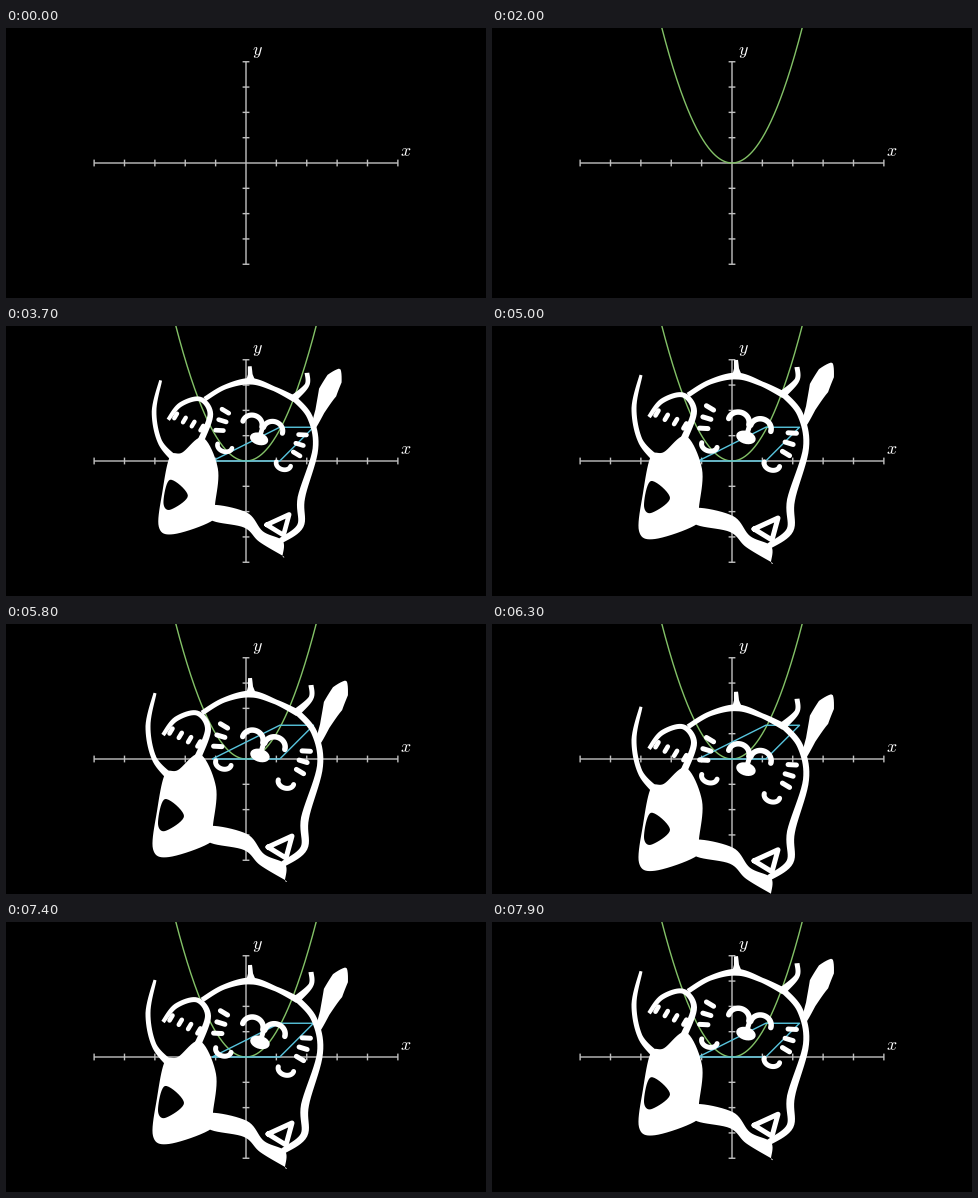
These frames come from a looping animation (480 px wide and 270 px high, 8 s). A matplotlib script:

```python
import numpy as np
import matplotlib.pyplot as plt
from matplotlib.animation import FuncAnimation
from matplotlib.patches import Polygon
from matplotlib.transforms import Affine2D

W, H, DPI = 480, 270, 100
FRAMES, STEP = 80, 100
CX, CY, UNIT = 240, 135, 33.75
XSTEP, YSTEP = 30.375, 25.3125
PX = 72 / DPI
GREY, GREEN, BLUE, WHITE = "#c0c0c0", "#83c167", "#58c4dd", "#ffffff"

plt.rcParams["mathtext.fontset"] = "cm"
fig = plt.figure(figsize=(W / DPI, H / DPI), dpi=DPI, facecolor="black")
ax = fig.add_axes([0, 0, 1, 1])
ax.set_xlim(0, W)
ax.set_ylim(H, 0)
ax.axis("off")


def sigmoid(v):
    return 1 / (1 + np.exp(-v))


def smooth(t):
    t = np.clip(t, 0, 1)
    edge = sigmoid(-5)
    return float(np.clip((sigmoid(10 * (t - 0.5)) - edge) / (1 - 2 * edge), 0, 1))


def running_start(t):
    """Bezier easing that first pulls back."""
    t = float(np.clip(t, 0, 1))
    u = 1 - t
    return (-7.5 * t**2 * u**4 - 10 * t**3 * u**3
            + 15 * t**4 * u**2 + 6 * t**5 * u + t**6)


def spline(points, closed=False, n=10):
    """Catmull-Rom curve through the points; a repeated point makes a corner."""
    p = np.array(points, float)
    p = np.vstack([p[-1:], p, p[:2]]) if closed else np.vstack([p[:1], p, p[-1:]])
    t = np.linspace(0, 1, n, endpoint=False)[:, None]
    parts = []
    for a, b, c, d in zip(p, p[1:], p[2:], p[3:]):
        parts.append(0.5 * (2 * b + (c - a) * t + (2 * a - 5 * b + 4 * c - d) * t**2
                            + (3 * b - a - 3 * c + d) * t**3))
    return np.vstack(parts + [p[-2:-1]])


def line(xs, ys, color, width, z):
    return ax.plot(xs, ys, color=color, lw=width * PX, zorder=z, snap=False,
                   solid_capstyle="butt")[0]


# Axes
def axis(direction, step, count):
    along = np.array(direction)
    across = along[::-1] * 3.4
    spots = [(k, np.array([CX, CY]) + along * k * step) for k in range(-count, count + 1)]
    line(*np.transpose([spots[0][1], spots[-1][1]]), GREY, 1.4, 1)
    for k, spot in spots:
        if k:
            line(*np.transpose([spot - across, spot + across]), GREY, 1.4, 1)


axis((1, 0), XSTEP, 5)
axis((0, 1), YSTEP, 4)
for name, x, y in (("$x$", 394.5, 128), ("$y$", 246, 26.5)):
    ax.text(x, y, name, color=WHITE, fontsize=18 * PX, va="baseline", zorder=1)

curve = line([], [], GREEN, 1.4, 2)
shape = line([], [], BLUE, 1.4, 3)
CORNERS = np.array([(-1, 0), (1, 0), (2, 1), (1, 1), (-1, 0)]) * (UNIT, -UNIT) + (CX, CY)

# Cat, drawn at full size
cat_fills, cat_strokes = [], []


def fill(outline, color=WHITE, z=5):
    cat_fills.append(ax.add_patch(Polygon(outline, fc=color, ec="none", lw=0, zorder=z)))


def blob(points, color=WHITE, z=5):
    fill(spline(points, closed=True), color, z)


def brush(points, *widths):
    """Stroke along a spline whose width runs through the given values."""
    path = spline(points)
    along = np.linspace(0, 1, len(path))
    half = np.interp(along, np.linspace(0, 1, len(widths)), widths) / 2
    dx, dy = np.gradient(path, axis=0).T
    offset = np.column_stack([-dy, dx]) * (half / np.hypot(dx, dy))[:, None]
    fill(np.vstack([path + offset, (path - offset)[::-1]]))


def stroke(points, width=5):
    item = line(*np.transpose(points), WHITE, width, 7)
    item.set_solid_capstyle("round")
    item.set_solid_joinstyle("round")
    cat_strokes.append((item, width))


def draw_body():
    brush([(149, 49), (142, 82), (148, 114), (164, 133)], 3, 5, 5, 8)
    blob([(159, 130), (151, 167), (147, 205), (163, 213), (205, 198), (207, 181),
          (210, 143), (194, 110), (172, 126)])
    blob([(159, 155), (178, 172), (159, 187), (152, 179)], "black", 6)
    brush([(157, 91), (170, 75), (191, 69), (202, 85), (192, 113)], 4, 5, 5, 6, 7)
    for k in range(4):
        x, y = 165 + 9.3 * k, 87 + 4.3 * k
        stroke([(x - 1.5, y + 2.5), (x + 1.5, y - 2.5)], 4.6)


def draw_head():
    brush([(196, 69), (218, 56), (245, 50), (270, 58), (292, 69)], 5, 5, 7, 5, 7)
    brush([(244, 34), (245, 51)], 4, 5, 12)
    brush([(305, 41), (305, 54), (291, 68)], 5, 5, 8)
    brush([(290, 67), (308, 88), (314, 122), (299, 174), (298, 204), (277, 220)],
          6, 6, 6, 8, 7, 6)
    brush([(340, 37), (327, 62), (312, 99)], 2, 17, 20, 10, 5)
    blob([(203, 182), (241, 190), (258, 210), (279, 220), (279, 236), (279, 236),
          (254, 221), (238, 206), (203, 198)])
    stroke([(262, 203), (286, 192), (280, 214), (262, 203)])


def draw_face():
    """Face features, mirrored about a tilted axis through the nose."""
    tilt = Affine2D().rotate_deg(17).translate(256, 104.7)

    def arc(u, v, rx, ry, start, end):
        a = np.radians(np.linspace(start, end, 24))
        return tilt.transform(np.column_stack([u + rx * np.cos(a), v + ry * np.sin(a)]))

    fill(arc(0, 7, 10, 6.5, 0, 360))
    stroke(tilt.transform([(0, -5), (0, 5)]))
    for side in (-1, 1):
        stroke(arc(side * 11.5, -6, 10.5, 9.5, 180, 360), 5.5)
        stroke(arc(side * 32.7, 25, 8, 6, 0, 180))
        for k in (-1, 0, 1):
            center = np.array([side * 43, 10.7 * k])
            lean = np.radians(14 * k) * side
            half = 4.2 * np.array([np.cos(lean), np.sin(lean)])
            stroke(tilt.transform([center - half, center + half]))


draw_body()
draw_head()
draw_face()


def draw_curve(t):
    x = np.linspace(-5, -5 + 10 * smooth(t / 2), 400)
    curve.set_data(CX + x * XSTEP, CY - x**2 * YSTEP)


def draw_shape(t):
    amount = 4 * smooth((t - 2) / 0.9)
    side = min(int(amount), 3)
    tip = CORNERS[side] + (CORNERS[side + 1] - CORNERS[side]) * (amount - side)
    shape.set_data(*np.vstack([CORNERS[:side + 1], tip]).T)
    shape.set_visible(amount > 0)


def place_cat(t):
    scale = smooth((t - 2.9) / 1.05)
    if t < 6.5:
        drop = running_start((t - 5) / 1.16)
    else:
        drop = 1 - smooth((t - 6.5) / 1.5)
    move = (Affine2D().translate(-CX, -CY).scale(max(scale, 1e-3))
            .translate(CX, CY + drop * UNIT)) + ax.transData
    for item, width in cat_strokes:
        item.set_linewidth(width * scale * PX)
    for item in cat_fills + [item for item, _ in cat_strokes]:
        item.set_transform(move)
        item.set_visible(scale > 0)


def update(frame):
    t = frame * STEP / 1000
    draw_curve(t)
    draw_shape(t)
    place_cat(t)
    return []


anim = FuncAnimation(fig, update, frames=FRAMES, interval=STEP,
                     repeat=True, repeat_delay=0, blit=False)
plt.show()
```
